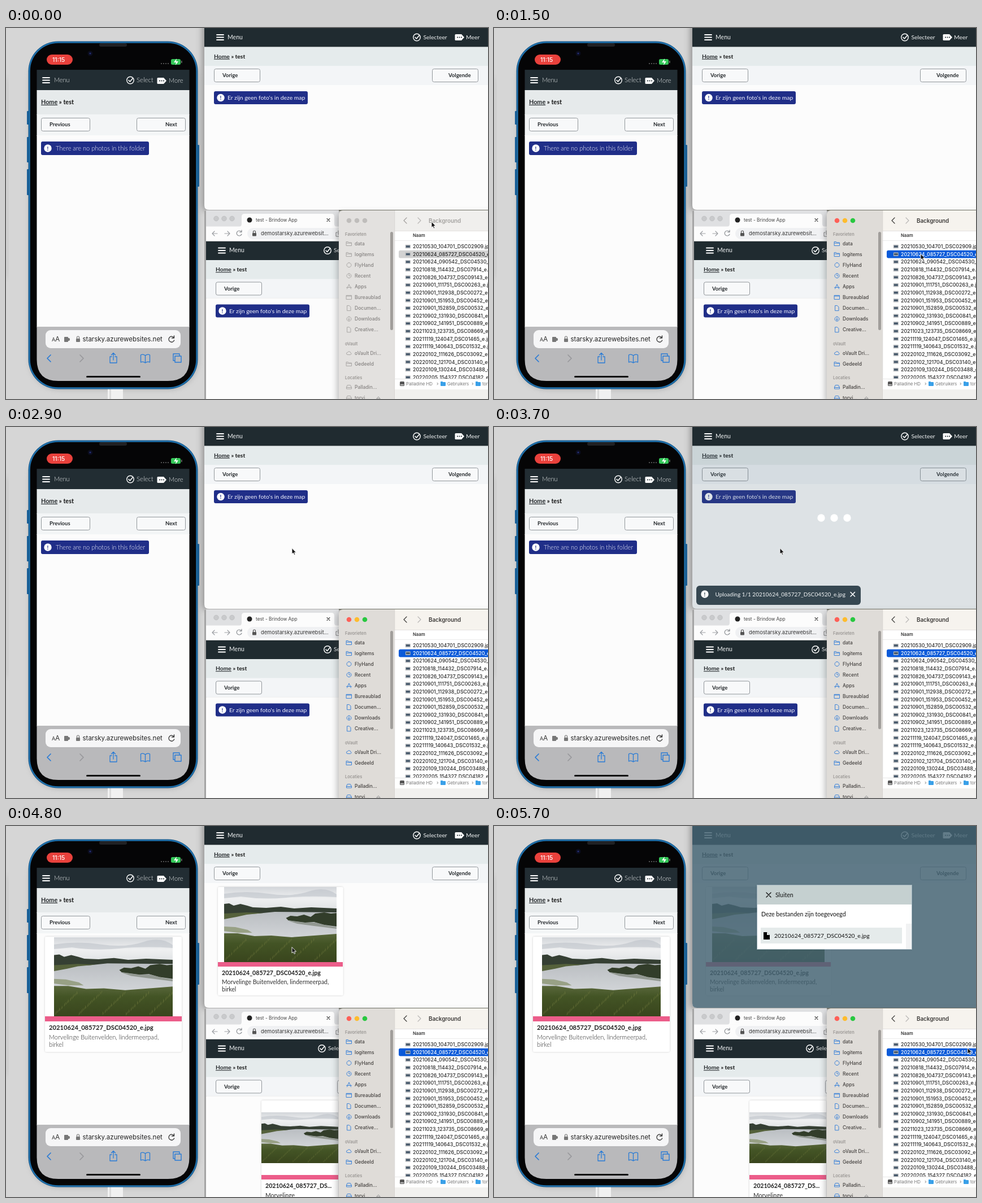
An HTML page that plays this animation: 853x657 px, repeating every 5800 ms.

```html
<!DOCTYPE html>
<html lang="nl">
<head>
<meta charset="utf-8">
<title>Upload demo</title>
<style>
html, body { margin: 0; width: 100%; height: 100%; overflow: hidden; background: #d6d6d6 }
svg { display: block; width: 853px; height: 657px }
text { font-family: Inter, "Liberation Sans", sans-serif; white-space: pre }
.web, .web text { font-family: Lato, "Open Sans", sans-serif }
.b { font-weight: 700 }
.m { font-weight: 500 }
.s { font-weight: 600 }
.thin { font-weight: 300 }
.u { text-decoration: underline }
.line { fill: none; stroke-linecap: round; stroke-linejoin: round }
#finder { --ic: #3b82d8; --txt: #44413f; --title: #3c3a38; --side: #dfdcd8; --bar: #f6f3ee; --sel: #0a5ad9; --selTxt: #fff; --r: #fe5f57; --y: #febc2e; --g: #28c840 }
#finder.off { --ic: #a9a7a5; --txt: #858280; --title: #a2a09e; --side: #e3e1df; --bar: #f0efed; --sel: #d2d2d2; --selTxt: #222; --r: #bfbdbb; --y: #bfbdbb; --g: #bfbdbb }
</style>
</head>
<body>
<svg id="stage" viewBox="0 0 853 657"></svg>
<script>
const LOOP = 5800, STEP = 100;
const ACTIVE = 500, PRESS = 1600, OVER = 1900, DROP = 2800, TOAST = 3000, FADE = 3350, DONE = 4700, MODAL = 4900;
const FILE = '20210624_085727_DSC04520_e.jpg', VEIL = '#456373';
const stage = document.getElementById('stage');

// Drawing helpers; text is placed by its vertical middle.
const text = (x, mid, str, size, fill = '#111', cls = '') =>
  `<text x="${x}" y="${mid + size * .36}" font-size="${size}" fill="${fill}" class="${cls}">${str}</text>`;
const rect = (x, y, w, h, fill, r = 0, more = '') =>
  `<rect x="${x}" y="${y}" width="${w}" height="${h}" rx="${r}" fill="${fill}" ${more}/>`;
const dot = (x, y, r, fill, more = '') => `<circle cx="${x}" cy="${y}" r="${r}" fill="${fill}" ${more}/>`;
const line = (d, color, w = 1.2, x = 0, y = 0) =>
  `<path class="line" d="${d}" stroke="${color}" stroke-width="${w}" transform="translate(${x} ${y})"/>`;
const group = (id, body, more = '') => `<g id="${id}" ${more}>${body}</g>`;

const burger = (x, y) => line('M0-4.500h12M0 0h12M0 4.500h12', '#fff', 1.8, x, y);
const check = (x, y) => dot(x, y, 6.2, 'none', 'stroke="#fff" stroke-width="1.4"') + line('M-3 0l2.4 2.5l5-6', '#fff', 1.6, x, y);
const tag = (x, y) => `<path d="M${x + 1} ${y - 5.5}h10l5 5.5l-5 5.5h-10q-1.5 0-1.5-1.5v-8q0-1.5 1.5-1.5z" fill="#fff"/>` +
  [4, 7.5, 11].map(i => dot(x + i, y, 1.1, '#222d33')).join('');
const button = (x, y, w, label, lx, size = 9.5) =>
  rect(x + .5, y + .5, w - 1, 23, '#f8f9fa', 3, 'stroke="#92979b"') + text(lx, y + 12, label, size, '#25292c', 'b');
const notice = (x, y, w, h, str, size, cls, tx) => rect(x, y, w, h, '#202e88', 3) +
  dot(x + 12, y + h / 2, 6.7, '#fff') + text(x + 10.4, y + h / 2, '!', 10, '#202e88', 'b') +
  text(tx, y + h / 2, str, size, '#f4f5ff', cls);
const crumbs = (x, y, size) => text(x, y, 'Home', size, '#25292c', 'b u') +
  text(x + size * 2.95, y, '» test', size, '#111', 'b');
const photo = (x, y, w, h) => `<use href="#photo" x="${x}" y="${y}" width="${w}" height="${h}"/>`;
const card = (x, y, w, h) => rect(x, y, w, h, '#fff', 3, 'filter="url(#soft)"');
const PLACE = ['Morvelinge Buitenvelden, lindermeerpad,', 'birkel'];

function defs() {
  let blades = '';
  for (let i = 0; i < 120; i++) {
    const x = i * 61.8 % 200, y = 94 + i * 17.3 % 38;
    blades += `M${x.toFixed(1)} ${y.toFixed(1)}l${i % 3 - 1}-4`;
  }
  return `<defs>
  <filter id="soft" x="-10%" y="-10%" width="120%" height="120%"><feDropShadow dx="0" dy="0" stdDeviation="1.6" flood-opacity=".2"/></filter>
  <filter id="blur" x="-60%" y="-20%" width="220%" height="140%"><feGaussianBlur stdDeviation="6"/></filter>
  <linearGradient id="sky" x2="0" y2="1"><stop stop-color="#d3d6da"/><stop offset=".5" stop-color="#eff0f1"/><stop offset="1" stop-color="#dfe2e4"/></linearGradient>
  <linearGradient id="water" x2="0" y2="1"><stop stop-color="#b9bdc1"/><stop offset=".5" stop-color="#d0d3d6"/><stop offset="1" stop-color="#b4b9bd"/></linearGradient>
  <linearGradient id="grass" x2="0" y2="1"><stop stop-color="#59673b"/><stop offset=".35" stop-color="#435425"/><stop offset="1" stop-color="#39451d"/></linearGradient>
  <clipPath id="topClip"><path d="M351 0H853V322H359q-8 0-8-8z"/></clipPath>
  <clipPath id="lowClip"><rect x="354" y="323" width="235" height="334"/></clipPath>
  <clipPath id="listClip"><rect x="688" y="377" width="165" height="244"/></clipPath>
  <symbol id="photo" viewBox="0 0 200 133" preserveAspectRatio="none">
    <rect width="200" height="42" fill="url(#sky)"/><rect y="42" width="200" height="91" fill="url(#water)"/>
    <path d="M0 12Q40 6 80 12T150 8T200 13V18Q150 15 110 19T30 17L0 20z" fill="#bfc4ca" opacity=".6"/>
    <path d="M0 30l9-1l8 4l12-3l12 3l10 3l24 1l26-2l24 3l30-2l45 2V45L90 44L60 47L28 48L0 53z" fill="#353f33"/>
    <path d="M0 47l40-2l30 1l-30 3l-18 4l-22 4z" fill="#55613b"/>
    <path d="M110 55l8-4l12 1l12-3l12 4l8-6l16-2l12 2l10-1V70l-22-3l-18-5l-16 1l-30-4z" fill="#323d2a"/>
    <path d="M112 59l30 4l20 0l20 5l18 3v3l-40-5l-30-4z" fill="#7c8478" opacity=".7"/>
    <path d="M0 70l20 1l22 5l8 5l-26 0l-24-3z" fill="#8d9674" opacity=".8"/>
    <path d="M0 82l24 0l30 5l30-1l36 3l40-3l40-3v50H0z" fill="url(#grass)"/>
    <path d="${blades}" stroke="#838a49" stroke-width=".7" opacity=".5"/>
  </symbol></defs>`;
}

function phone() {
  const blue = '#287bd6';
  const body = rect(44, 40, 294, 598, '#777', 50, 'opacity=".55" filter="url(#blur)"') +
    rect(0, 88, 3, 355, '#888', 0, 'opacity=".45" filter="url(#blur)"') +
    rect(180, 636, 27, 30, '#f1f1f1') + rect(183, 636, 3, 30, '#dcdcdc') +
    [[147, 24], [193, 45], [250, 46]].map(([y, h]) => rect(37, y, 4, h, '#1b629b', 1)).join('') +
    rect(338, 207, 4, 74, '#1b629b', 1) +
    rect(39.5, 23.5, 300, 616, '#0e4d7e', 53) +
    rect(41.5, 25.5, 296, 612, '#050506', 51, 'stroke="#2070ab" stroke-width="2.4"') +
    rect(165, 27, 49, 6, '#202124', 3) + dot(149, 45, 4.5, '#0b0d1d') + dot(149, 45, 1.5, '#25307a') +
    rect(72, 47, 46, 18, '#e9413c', 9) + text(82, 56, '11:15', 10.4, '#fff', 'm') +
    [275, 279, 283, 287].map(x => dot(x, 63, .9, '#777')).join('') +
    rect(292, 55, 17, 10, '#35c759', 2.5) + rect(310, 58, 1.5, 4, '#777') +
    '<path d="M302 54l-5 7h4l-1 5l5-7h-4z" fill="#fff"/>';
  const screen = rect(54.5, 74, 270, 37, '#222d33') + rect(54.5, 110, 270, 44, '#e6eaeb') +
    rect(54.5, 153, 270, 38, '#f3f5f6') + rect(54.5, 190, 270, 340, '#fcfcfc') +
    '<path d="M54.5 529H324.5V587q0 38-38 38H92.5q-38 0-38-38z" fill="#b9b9bb"/>' +
    burger(65, 92.5) + text(85, 92.5, 'Menu', 11, '#e8ebec', 'thin') + check(220, 92.5) +
    text(231, 92, 'Select', 11.4, '#e8ebec', 'thin') + tag(268, 93.5) + text(288, 93, 'More', 11.2, '#e8ebec', 'thin') +
    crumbs(62, 131, 10.8) + button(62, 159, 87, 'Previous', 77) + button(231, 159, 87, 'Next', 282);
  const bar = rect(70, 535, 239, 32, '#f6f6f7', 9) + text(81, 552, 'A', 9, '#333') + text(87, 551, 'A', 12, '#333') +
    rect(103, 547, 7, 9, '#777', 1) + rect(108, 549, 5, 5, '#777', 2) +
    rect(124, 550, 7, 6, '#777', 1) + line('M125.5 550v-2a2 2 0 0 1 4 0v2', '#777') +
    text(135.5, 551, 'starsky.azurewebsites.net', 11.5, '#222') +
    line('M297.5 549a5 5 0 1 0 .2 4M297.5 545v4h-4', '#333', 1.3) +
    line('M79 579l-6 6l6 6', blue, 1.7) + line('M131 579l6 6l-6 6', '#98989b', 1.7) +
    line('M187 582h-3v11h12v-11h-3M190 588v-12M186.5 579l3.5-3.5l3.5 3.5', blue, 1.3) +
    line('M246.5 580q-4-3-8-1v13q4-2 8 1q4-3 8-1v-13q-4-2-8 1zv13', blue, 1.3) +
    line('M299 581h11v11h-11zM299 589h-3v-12h11v4', blue, 1.4) + rect(142, 616, 96, 3, '#111', 1.5);
  const added = card(69, 196, 242, 204) + photo(85, 197, 210, 140) + rect(69, 337, 242, 9, '#ec5d8a') +
    text(76, 357, FILE, 11.2, '#222', 'b') + PLACE.map((s, i) => text(76, 374 + i * 13, s, 11, '#222', 'thin')).join('');
  return body + `<g class="web">${screen}${group('phoneEmpty', notice(62, 201, 191, 24, 'There are no photos in this folder', 11, 'thin', 88))}${group('phoneAdded', added)}</g>` + bar;
}

// Shared chrome of the two desktop pages, placed at the upper window.
const pageBase = () => rect(351, 0, 502, 33.5, '#202b30') + rect(351, 33.5, 502, 34, '#e5ebec') +
  rect(351, 67, 502, 34, '#f3f5f7') + rect(351, 101, 502, 280, '#fcfcfc') +
  burger(373, 16.5) + text(392, 16, 'Menu', 10.5, '#f1f3f4') + crumbs(368, 50, 10.3) + button(368, 72, 82, 'Vorige', 383);
const empty = () => notice(368, 112, 166, 23, 'Er zijn geen foto\'s in deze map', 10.4, '', 392);

function topWindow() {
  const head = check(727, 16.5) + text(738.5, 16, 'Selecteer', 10.3, '#f1f3f4') + tag(795, 16.5) + text(814, 16, 'Meer', 10.4, '#f1f3f4');
  const added = card(375, 108, 221.5, 192) + photo(386, 108, 199, 133) + rect(375, 241, 221, 8, '#ec5d8a') +
    text(382, 260, FILE, 10.6, '#222', 'b') + PLACE.map((s, i) => text(382, 276 + i * 13, s, 10.5, '#333')).join('');
  const toast = rect(358, 281, 291, 34, '#293c46', 6, 'opacity=".93"') + dot(373, 296, 6.7, '#fff') +
    text(371.4, 296, '!', 10, '#293c46', 'b') + text(391.5, 296, 'Uploading 1/1 ' + FILE, 10, '#f4f6f7') +
    line('M631 292.5l7.5 7.5M638.5 292.5l-7.5 7.5', '#fff', 1.6);
  const modal = rect(351, 0, 502, 322, VEIL, 0, 'opacity=".84"') +
    rect(465, 104, 275, 115, '#dbe9f3', 0, 'opacity=".5" filter="url(#soft)"') + rect(466, 105, 273, 113, '#fff') +
    rect(466, 105, 273, 34, '#c5d0d0') + rect(729, 173, 10, 45, '#f1f2f3') + rect(472, 180, 250, 28, '#e5ebeb') +
    line('M482 118l8 8M490 118l-8 8', '#111', 1.4) + text(498, 122, 'Sluiten', 10.5) +
    text(473, 156, 'Deze bestanden zijn toegevoegd', 10.5) +
    '<path d="M477 188h6l5 5v8h-11z"/><path d="M483 188v5h5z" fill="#e5ebeb"/>' + text(496, 194, FILE, 10.25);
  const border = `<path d="M371 3H853M358 319.5H853M354.5-5V322M850-5V322" fill="none" stroke="#1458bd" stroke-width="7" stroke-dasharray="20 19"/>`;
  const dots = [0, 1, 2, 3].map(() => dot(0, 161, 6.7, '#fff', 'class="load"')).join('');
  return rect(348, -10, 510, 334, '#444', 8, 'opacity=".5" filter="url(#blur)"') + rect(589, 318, 264, 6, '#77786c') +
    `<g class="web" clip-path="url(#topClip)">${pageBase()}${head}${button(754, 72, 82, 'Volgende', 783)}` +
    group('topEmpty', empty()) + group('topAdded', added) +
    group('veil', rect(351, 33.5, 502, 289, VEIL)) + group('loader', dots) + group('toast', toast) +
    group('modal', modal) + group('border', border) + '</g>';
}

function lowBrowser() {
  const select = check(569, 394) + text(580, 393.5, 'Selecteer', 10.3, '#f1f3f4');
  const added = card(452, 486, 136, 190) + photo(452, 507, 136, 90) + rect(452, 618, 136, 8, '#ec5d8a') +
    text(459, 637, '20210624_085727_DS...', 10.6, '#222', 'b') + text(459, 654, 'Morvelinge', 10.5, '#333');
  const chrome = rect(354, 323, 235, 30, '#dfe0e2') + [372, 386, 400].map(x => dot(x, 337.5, 4.3, '#c9cacc', 'stroke="#b5b6b8" stroke-width=".6"')).join('') +
    '<path d="M412 352q5 0 5-5v-13q0-5 5-5h154q5 0 5 5v13q0 5 5 5z" fill="#fcfcfc"/>' + rect(354, 351.5, 235, 26, '#fcfcfc') +
    dot(431, 340, 4.5, '#222') + text(442, 340, 'test - Brindow App', 8.3, '#444') +
    line('M568 337.5l5 5M573 337.5l-5 5', '#444', 1.1) +
    line('M374 364h-9M369 360l-4 4l4 4', '#9b9ea2') + line('M387 364h9M392 360l4 4l-4 4', '#9b9ea2') +
    line('M416.5 361a4.5 4.5 0 1 0 .5 4M417 358v3.5h-3.5', '#888c90') +
    rect(427, 354, 170, 20, '#f0f1f3', 10) + rect(436, 363, 7, 5.5, '#555', 1) + line('M437.5 363v-2a2 2 0 0 1 4 0v2', '#555') +
    text(451, 364, 'demostarsky.azurewebsit...', 9.25, '#333') + line('M586 362h-2v7h8M588 366v-7', '#777', 1);
  return `<g clip-path="url(#lowClip)"><g class="web"><g transform="translate(3 377.5)">${pageBase()}${group('lowEmpty', empty())}</g>` +
    group('lowAdded', added + button(586, 450, 82, '', 600)) + group('lowSelect', select) + '</g>' + chrome + '</g>';
}

const DISC = 'M5 1a4 4 0 1 0 .01 0z';
const ICONS = {
  folder: 'M.5 2h3l1 1.5h5v5.5h-9zM.5 4.5h9', disc: DISC, clock: DISC + 'M5 3v2.2h2', down: DISC + 'M5 3v4M3.3 5.5l1.7 1.7l1.7-1.7',
  apps: 'M1.5 9L5 1l3.5 8M.5 6.5h9', desk: 'M.5 1.5h9v7h-9zM.5 3h9', doc: 'M2 .5h3.5l2.5 2.5v6.5h-6z',
  cloud: 'M2.5 8a2 2 0 0 1 0-4a2.8 2.8 0 0 1 5.3.6a1.8 1.8 0 0 1 0 3.4z', drive: 'M2.5 2h5l2 4v2.5h-9v-2.5zM.5 6h9'
};
const SIDE = [
  [381.5, 'folder data', 'folder logitems', 'disc FlyHand', 'clock Recent', 'apps Apps', 'desk Bureaublad', 'doc Documen...', 'down Downloads', 'doc Creative...'],
  [575.5, 'cloud oVault Dri...', 'folder Gedeeld'], [635.5, 'drive Palladin...', 'drive torvi...']
];
const SHOTS = `20210530_104701_DSC02909 20210624_085727_DSC04520 20210624_090542_DSC04530 20210818_114432_DSC07914
20210826_104737_DSC09143 20210901_111751_DSC00263 20210901_112938_DSC00272 20210901_151953_DSC00452 20210901_152859_DSC00532
20210902_131930_DSC00841 20210902_141951_DSC00889 20211023_123735_DSC08669 20211119_124047_DSC01465 20211119_140643_DSC01532
20220102_111626_DSC03092 20220102_121704_DSC03140 20220109_130244_DSC03488 20220205_154327_DSC04182`.split(/\s+/);
const thumb = (x, y) => rect(x, y - 3, 8.5, 6, '#c9ccd0', .5, 'stroke="#999" stroke-width=".4"') + rect(x + .8, y - 1.8, 7, 3.5, '#46586a');

function finder() {
  const side = SIDE.map(([top, ...items]) => items.map((item, i) => {
    const cut = item.indexOf(' '), y = top + i * 19.1;
    return line(ICONS[item.slice(0, cut)], 'var(--ic)', 1, 602, y - 5) + text(617, y, item.slice(cut + 1), 8.5, 'var(--txt)', 'm');
  }).join('')).join('') + [[365.5, 'Favorieten'], [559.5, 'oVault'], [619.5, 'Locaties']].map(([y, s]) => text(600, y, s, 7.4, '#9a9794', 's')).join('');
  const rows = SHOTS.map((name, i) => {
    const y = 387 + i * 13.63, chosen = i === 1;
    return (chosen ? rect(695, y - 6.8, 170, 13.6, 'var(--sel)', 3) : '') + thumb(707, y) +
      text(720, y, name + (i ? '_e.jpg' : '.jpg'), 8.8, chosen ? 'var(--selTxt)' : '#2a2a2a', 'm');
  }).join('');
  const folder = x => rect(x, 627, 9, 7, '#3aa0e8', 1) + rect(x, 626, 4, 2, '#3aa0e8', .5);
  const path = rect(688, 621, 165, 19, '#fff') + rect(688, 621, 165, .7, '#ddd') + rect(697, 626, 8, 8, '#555', 1.5) + rect(698, 631, 6, 2, '#bbb') +
    text(708, 630.5, 'Palladine HD', 7.8, '#777') + text(762, 630, '›', 9, '#777') + folder(769) + text(781, 630.5, 'Gebruikers', 7.4, '#777') +
    text(824, 630, '›', 9, '#777') + folder(831) + text(843, 630.5, 'tor', 7.4, '#777');
  return rect(587, 328, 280, 340, '#444', 8, 'opacity=".4" filter="url(#blur)"') +
    group('finder', rect(589, 323, 274, 344, 'var(--side)', 7) + rect(687.5, 323, 170, 37, 'var(--bar)') +
    rect(687.5, 359, 170, 263, '#fff') + rect(687.5, 359, 170, .7, '#d8d5d2') + rect(687.5, 376, 170, .7, '#e4e4e4') +
    rect(687.5, 323, .7, 334, '#cbc8c5') + rect(688, 640, 165, 17, '#f2f1ef') +
    ['r', 'y', 'g'].map((c, i) => dot(607 + i * 14, 341, 4.3, `var(--${c})`)).join('') +
    line('M709 336l-5 5l5 5', 'var(--title)') + line('M729 336l5 5l-5 5', '#b9b7b5') +
    text(748, 341, 'Background', 9.8, 'var(--title)', 's') + text(720, 367.5, 'Naam', 7.7, '#333', 's') +
    side + rect(680, 361, 5, 174, '#a19e9b', 2.5) + `<g clip-path="url(#listClip)">${rows}</g>` + path +
    line('M656 656l3-3l3 3z', '#999', 1));
}

const dragged = thumb(-48, 0) + rect(-37, -6, 162, 12, '#1f6ae6', 6) + text(-34, 0, FILE, 8.8, '#fff', 'm') +
  dot(0, 0, 25.5, 'none', 'stroke="#111" stroke-width="2"');
const badge = dot(6, 14, 6.5, '#2ba53a', 'stroke="#e8f5e8" stroke-width=".6"') + line('M2.8 14h6.4M6 10.8v6.4', '#fff', 1.4);
const arrow = '<path d="M0 0V10.5L2.4 8.3L4.1 12L5.8 11.2L4.2 7.7H7.5z" fill="#111" stroke="#fff" stroke-width=".9"/>';

stage.innerHTML = defs() + rect(0, 0, 853, 657, '#d6d6d6') + phone() + topWindow() +
  rect(351, 324, 4, 333, '#a5a5a5') + lowBrowser() + finder() +
  group('drag', dragged) + group('pointer', arrow + group('badge', badge));

const el = id => document.getElementById(id);
const loads = [...document.querySelectorAll('.load')];
const show = (id, on) => el(id).setAttribute('visibility', on ? 'visible' : 'hidden');
const move = (node, x, y) => node.setAttribute('transform', `translate(${x} ${y})`);

const TRACK = [[0, 753, 343], [700, 753, 343], [1200, 755, 400], [PRESS, 755, 400], [2200, 569.5, 268],
  [2700, 506, 214.5], [4800, 506, 214.5], [5600, 838, 393], [LOOP, 838, 393]];
function pointerAt(t) {
  const i = TRACK.findIndex(k => k[0] > t), [t0, x0, y0] = TRACK[i - 1], [t1, x1, y1] = TRACK[i];
  const u = (t - t0) / (t1 - t0), e = u * u * (3 - 2 * u);
  return [x0 + (x1 - x0) * e, y0 + (y1 - y0) * e];
}

// Closed form of cubic-bezier(0, 1, 1, 0).
function snap(u) {
  const s = .5 - Math.sin(Math.asin(1 - 2 * u) / 3);
  return 3 * (1 - s) ** 2 * s + s ** 3;
}

function draw(now) {
  const t = Math.floor(now % LOOP / STEP) * STEP;
  const [x, y] = pointerAt(t), done = t >= DONE;
  const dragging = t >= PRESS && t < DROP, over = t >= OVER && t < DROP;
  el('finder').classList.toggle('off', t < ACTIVE);
  for (const part of ['phone', 'top', 'low']) {
    show(part + 'Empty', !done);
    show(part + 'Added', done);
  }
  move(el('lowSelect'), done ? -10 : 0, 0);
  show('drag', dragging);
  show('badge', over);
  show('border', over);
  show('toast', t >= TOAST && !done);
  show('modal', t >= MODAL);
  move(el('drag'), x, y);
  move(el('pointer'), x, y);

  const loading = t >= FADE && !done;
  show('loader', loading);
  show('veil', loading);
  el('veil').setAttribute('opacity', Math.max(0, (t - FADE) * .00049));
  const e = snap(((t - 3700) / 406 % 1 + 1) % 1);
  [[579, e], [579 + 23 * e, 1], [602 + 23 * e, 1], [625, 1 - e]].forEach(([cx, k], i) => {
    loads[i].setAttribute('cx', cx);
    loads[i].setAttribute('r', 6.7 * k);
  });
  requestAnimationFrame(() => draw(performance.now() - start));
}
const start = performance.now();
draw(0);
</script>
</body>
</html>
```
